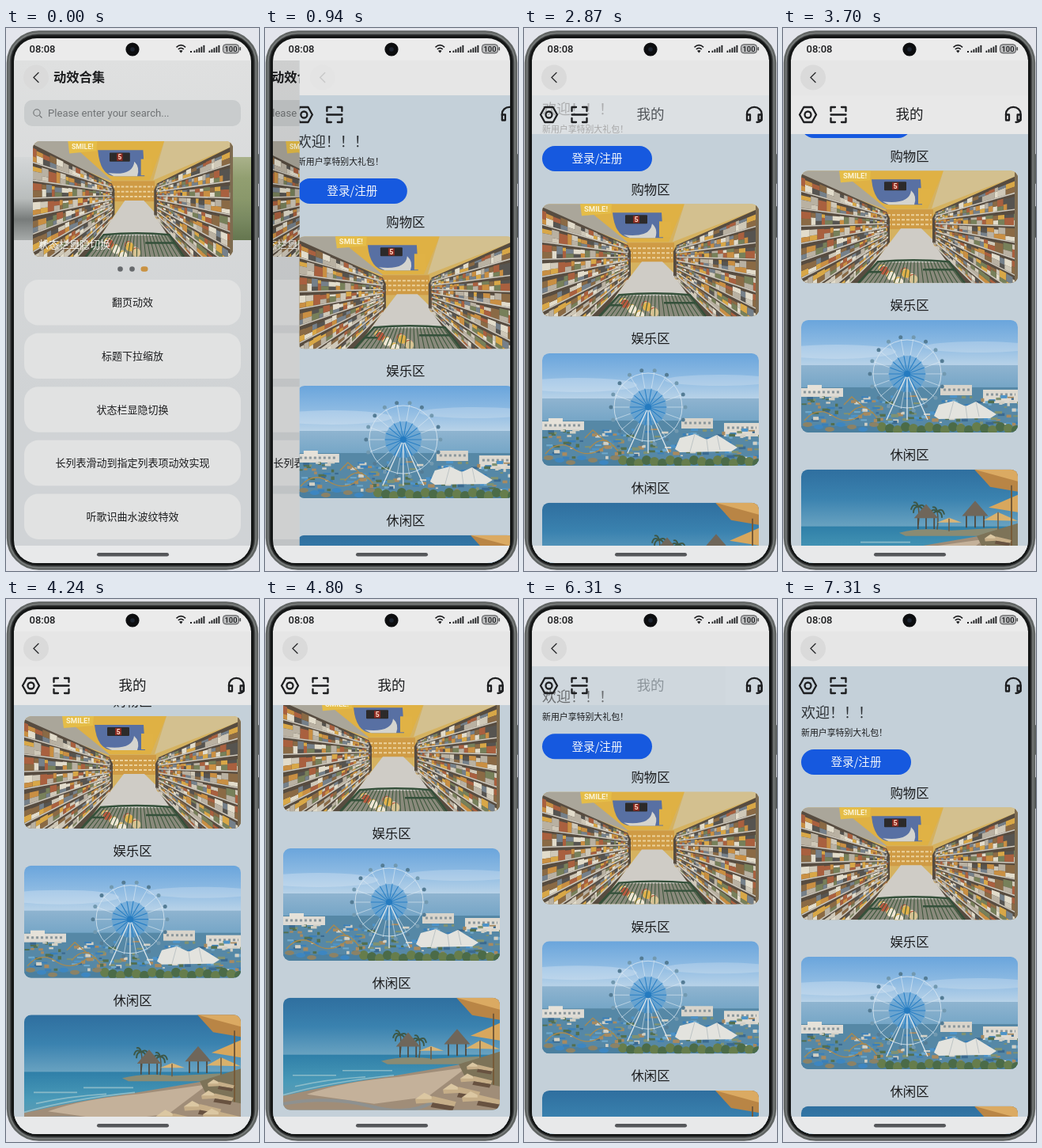
An HTML page that plays this animation: 320x686 px, repeating every 8 s.

```html
<!DOCTYPE html>
<html lang="zh-CN">
<head>
<meta charset="utf-8">
<title>动效合集</title>
<style>
  html, body { margin: 0; width: 100%; height: 100%; overflow: hidden; background: #e3e5ec; }
  svg { display: block; width: 100%; height: 100%; }
  text { font-family: "Noto Sans CJK SC", "Noto Sans CJK", sans-serif; }
  .latin { font-family: Roboto, sans-serif; }
  .icon { fill: none; stroke: #1d1e20; stroke-width: 2.3; stroke-linejoin: round; stroke-linecap: round; }
</style>
</head>
<body>
<svg id="stage" viewBox="0 0 320 686"></svg>
<script>
const LOOP = 8000;
const PHOTO_W = 274, PHOTO_H = 142;

let seed = 7;
const random = () => (seed = (seed * 16807) % 2147483647) / 2147483647;
const pick = list => list[Math.floor(random() * list.length)];
const clamp = v => Math.max(0, Math.min(1, v));
const range = (n, fn) => Array.from({ length: n }, (_, i) => fn(i)).join('');

// y is the visual centre of the line
function text(str, x, y, size, { fill = '#1b1c1e', weight = 500, anchor = 'start', cls = '' } = {}) {
  return `<text class="${cls}" x="${x}" y="${y + size * 0.37}" font-size="${size}" fill="${fill}"
    font-weight="${weight}" text-anchor="${anchor}">${str}</text>`;
}
const rect = (x, y, w, h, fill, r = 0, extra = '') =>
  `<rect x="${x}" y="${y}" width="${w}" height="${h}" rx="${r}" fill="${fill}" ${extra}/>`;
const poly = (points, fill) => `<polygon points="${points}" fill="${fill}"/>`;
const path = (d, fill, extra = '') => `<path d="${d}" fill="${fill}" ${extra}/>`;
const gradient = (id, ...colors) => `<linearGradient id="${id}" x2="0" y2="1">${
  colors.map((c, i) => `<stop offset="${i / (colors.length - 1)}" stop-color="${c}"/>`).join('')}</linearGradient>`;
const photo = (id, x, y, sx = 1, sy = 1) =>
  `<g transform="translate(${x} ${y}) scale(${sx} ${sy})" clip-path="url(#rounded)"><use href="#${id}"/></g>`;

// Shelves in one-point perspective, vanishing at (139, 66)
function shelf() {
  const colors = ['#d8a747', '#cfc8b8', '#a9603f', '#565450', '#75808a', '#e2dccb', '#8a6a45', '#c98f43', '#77805a', '#b9b1a2'];
  const goods = Object.fromEntries(colors.map(c => [c, '']));
  let edges = '';
  for (let k = -60; k < 135; k += 22) {
    for (let x = 0; x < 108;) {
      const near = (139 - x) / 139, w = (5 + random() * 8) * near, far = (139 - x - w) / 139;
      const split = k + 8 + random() * 5;
      const box = (top, bottom) => {
        goods[pick(colors)] += `M${x.toFixed(1)} ${(66 + top * near).toFixed(1)}L${(x + w).toFixed(1)} ${
          (66 + top * far).toFixed(1)}V${(66 + bottom * far).toFixed(1)}L${x.toFixed(1)} ${(66 + bottom * near).toFixed(1)}Z`;
      };
      box(k + 1 + random() * 4, split);
      box(split, k + 19);
      x += w;
    }
    edges += `M0 ${66 + k + 20}L108 ${66 + (k + 20) * 0.22}`;
  }
  return poly('0,4 108,52 112,60 112,90 74,142 0,142', '#574c40') +
    colors.map(c => path(goods[c], c)).join('') +
    path(edges, 'none', 'stroke="#cfcabf" stroke-width="1.5"');
}

function market() {
  return rect(0, 0, 274, 142, '#d5b260') +
    poly('0,0 50,0 110,50 0,10', '#aaa69a') +
    poly('48,0 180,0 160,48 108,48', '#dfb144') +
    poly('180,0 274,0 274,6 165,48', '#d3c08f') +
    path('M89 11H151L153 43H112Q92 42 89 11Z', '#5870a3') +
    path('M103 39Q137 43 139 25Q147 32 143 43H111Z', '#d4d4cf') +
    rect(148, 22, 15, 20, '#e0b245') +
    poly('48,0 88,0 87,12 50,15', '#e5bd48') +
    text('SMILE!', 68, 6, 9.5, { fill: '#faf3d5', weight: 700, anchor: 'middle', cls: 'latin' }) +
    rect(105, 14, 28, 11, '#2c2a2a', 1) + rect(115, 15, 8, 9, '#8d2b22') +
    text('5', 119, 19.5, 9, { fill: '#ffd9c4', weight: 700, anchor: 'middle', cls: 'latin' }) +
    rect(107, 49, 60, 25, '#cf9b45') +
    path('M109 56H165M109 62H165M109 68H165', 'none', 'stroke="#ebd19a" stroke-width="2" stroke-dasharray="4 2"') +
    poly('126,73 152,73 198,118 214,142 74,142 96,112', '#cfccc6') +
    shelf() + `<g transform="matrix(-1 0 0 1 278 0)">${shelf()}</g>` +
    rect(270, 0, 4, 142, '#7d6b50') +
    poly('96,116 186,116 205,142 74,142', '#8a8a7c') +
    range(14, i => `<circle cx="${103 + (i * 37) % 46}" cy="${124 + (i * 11) % 18}" r="5.5" fill="${
      ['#dfb04a', '#eee6d4', '#b75a40', '#d7c393'][i % 4]}"/>`) +
    path(range(22, i => `M${98 + i * 4.1} 115L${74 + i * 6.2} 142`), 'none', 'stroke="#3d573c" stroke-width="1.1"') +
    path('M72 142L97 115Q142 111 187 115L207 142M85 128H101M154 125H194', 'none', 'stroke="#34503a" stroke-width="2.4"');
}

function ferrisWheel() {
  const cx = 134, cy = 68, spokes = 18;
  const at = (i, r) => `${(cx + r * Math.cos(i * 2 * Math.PI / spokes)).toFixed(1)} ${
    (cy + r * Math.sin(i * 2 * Math.PI / spokes)).toFixed(1)}`;
  const rays = (from, to) => range(spokes, i => `M${at(i, from)}L${at(i, to)}`);
  const scatter = (n, y, h, colors) => range(n, () =>
    rect((random() * 274).toFixed(1), (y + random() * h).toFixed(1), (3 + random() * 7).toFixed(1), (1.5 + random() * 3).toFixed(1), pick(colors)));
  return rect(0, 0, 274, 58, 'url(#sky)') +
    `<ellipse cx="45" cy="40" rx="75" ry="9" fill="#dce8f2" opacity=".35"/>` +
    `<ellipse cx="225" cy="34" rx="70" ry="7" fill="#dce8f2" opacity=".3"/>` +
    rect(0, 57, 274, 30, 'url(#sea)') +
    rect(0, 85, 274, 57, '#5688a6') +
    rect(0, 86, 53, 11, '#dedbd4') + rect(8, 82, 18, 8, '#e6e2d9') + rect(176, 82, 40, 13, '#d8d4cb') +
    rect(230, 88, 44, 17, '#dedad1') + path('M3 91H50M180 88H213M234 94H271', 'none', 'stroke="#8b979c" stroke-width="3" stroke-dasharray="3 3"') +
    scatter(190, 95, 36, ['#3a7fb9', '#6fa8cb', '#a88a60', '#526f50', '#d2d0c5', '#3b6a90', '#7f9273', '#4d93c8']) +
    path('M4 127Q20 108 40 121T80 117M54 107L64 97L79 110M60 120Q78 98 96 124', 'none', 'stroke="#a8894f" stroke-width="1.3"') +
    `<circle cx="${cx}" cy="${cy}" r="23" fill="#5a9fd4" opacity=".6"/>` +
    path(rays(2, 24), 'none', 'stroke="#2b80c5" stroke-width="1.1"') +
    path(rays(23, 46), 'none', 'stroke="#dfebf3" stroke-width=".6"') +
    `<circle cx="${cx}" cy="${cy}" r="43" fill="none" stroke="#dce9f1" stroke-width=".8"/>` +
    path(`M${cx} ${cy}L108 126M${cx} ${cy}L160 126M${cx} ${cy}V126`, 'none', 'stroke="#dde6eb" stroke-width="1.3"') +
    `<circle cx="${cx}" cy="${cy}" r="4" fill="#257bc0"/>` +
    range(spokes, i => `<circle cx="${at(i, 47).replace(' ', '" cy="')}" r="2.5" fill="${i % 2 ? '#547c95' : '#7299b0'}"/>`) +
    poly('168,121 174,107 193,102 208,109 221,103 247,119 239,124 174,125', '#e3e3de') +
    path('M193 102L187 124M208 109L210 124M221 103L225 122', 'none', 'stroke="#bdc4c5"') +
    rect(0, 134, 274, 8, '#4b7f9f') +
    range(18, i => `<circle cx="${102 + i * 10}" cy="${135 + i % 3 * 2}" r="6" fill="${i % 2 ? '#4b6b48' : '#667d4c'}"/>`) +
    range(7, i => `<ellipse cx="${8 + i * 14}" cy="${132 + i % 3 * 3}" rx="6" ry="3" fill="${i % 2 ? '#3d86c1' : '#8b8266'}"/>`);
}

function beach() {
  const hut = (x, y, s) => `<g transform="translate(${x} ${y}) scale(${s})">` +
    path('M-12 0V18M12 0V18M0 0V18', 'none', 'stroke="#514a3f" stroke-width="2"') +
    poly('0,-19 18,2 -18,2', '#6f665a') + '</g>';
  const palm = (x, y) => path(`M${x} ${y}q2 10 0 23`, 'none', 'stroke="#5b5541" stroke-width="1.5"') +
    path(`M${x} ${y}q-7-5-9 4M${x} ${y}q7-5 9 4M${x} ${y}q-6 0-6 8M${x} ${y}q6 0 6 8M${x} ${y}q-2-7-6-5`, 'none', 'stroke="#3d5848" stroke-width="2"');
  const lounger = (x, y, s) => `<g transform="translate(${x} ${y}) scale(${s})">` +
    poly('0,0 20,-3 45,3 43,8 19,4 1,5', '#c6ae88') + poly('19,4 43,8 41,13 17,9', '#685240') +
    poly('0,0 10,-7 18,-3 18,0', '#dbc7a2') + '</g>';
  return rect(0, 0, 274, 73, 'url(#deepSky)') +
    rect(0, 72, 274, 70, 'url(#lagoon)') +
    path('M0 124Q70 108 138 99L238 82L274 90V142H0Z', '#a08d78') +
    path('M30 122Q75 106 146 100L232 88L183 125L115 134Z', '#c4b19a') +
    path('M0 123Q60 106 140 98M15 112Q55 103 104 100M75 92H138M12 98H67', 'none', 'stroke="#a9cbd0" stroke-width="1.6" opacity=".7"') +
    path('M0 134Q60 124 110 137T190 131', 'none', 'stroke="#8394a0" stroke-width="4" opacity=".6"') +
    path('M124 80Q150 73 190 77L250 74V84H132Z', '#8a8b73') +
    palm(148, 47) + palm(172, 53) + hut(158, 60, 0.85) + hut(220, 57, 0.92) +
    poly('172,67 187,61 203,67', '#dab577') + poly('231,64 249,54 274,65', '#d9b16c') +
    path('M249 54V96M187 62V78', 'none', 'stroke="#6e5a40" stroke-width="1.5"') +
    poly('219,0 274,0 274,28 239,22', '#b98545') + poly('219,0 274,0 274,15', '#dbaa62') +
    poly('237,48 274,32 274,54', '#d8a75d') +
    poly('222,84 274,68 274,112 232,104', '#7d7358') +
    path('M266 20V110', 'none', 'stroke="#765a38" stroke-width="2"') +
    lounger(232, 87, 0.75) + lounger(224, 102, 0.9) + lounger(202, 116, 1.05) + lounger(167, 128, 1.15) + lounger(226, 126, 1.1);
}

const backButton = `<circle cx="38" cy="62.5" r="16" fill="#dadada"/>` +
  path('M41 56.5L35 62.5L41 68.5', 'none', 'stroke="#2e2f31" stroke-width="1.4" stroke-linecap="round"');

function home() {
  const labels = ['翻页动效', '标题下拉缩放', '状态栏显隐切换', '长列表滑动到指定列表项动效实现', '听歌识曲水波纹特效'];
  return rect(-60, 41, 440, 640, 'url(#homeBg)') + backButton +
    text('动效合集', 60, 62, 16.3, { weight: 700 }) +
    rect(23, 91, 274, 33, '#c9cccd', 10) +
    path('M42.5 110.5L45.5 113.5', 'none', 'stroke="#6d7072" stroke-width="1.1"') +
    `<circle cx="39" cy="107" r="4.2" fill="none" stroke="#6d7072" stroke-width="1.1"/>` +
    text('Please enter your search...', 53, 107.5, 13.1, { fill: '#707375', weight: 400, cls: 'latin' }) +
    rect(10, 163, 40, 105, 'url(#leftPeek)') + rect(270, 163, 40, 105, 'url(#rightPeek)') +
    photo('market', 34, 143, 253 / PHOTO_W, 146 / PHOTO_H) +
    text('状态栏显隐切换', 41, 273, 13, { fill: '#f4f3ee', weight: 400 }) +
    '<circle cx="144.5" cy="304.5" r="3.3" fill="#66696c"/><circle cx="159.5" cy="304.5" r="3.3" fill="#66696c"/>' +
    rect(170.5, 301.2, 9, 6.6, '#c99242', 3.3) +
    labels.map((label, i) => rect(23, 318 + i * 67.6, 274, 57.5, '#e1e2e2', 18, i === 2 ? 'id="pressed"' : '') +
      text(label, 160, 346.5 + i * 67.6, 13, { anchor: 'middle' })).join('');
}

function scrollContent() {
  const sections = [['购物区', 'market'], ['娱乐区', 'ferris'], ['休闲区', 'beach']];
  return text('欢迎！！！', 23, 143, 18, { weight: 400, fill: '#2c3034' }) +
    text('新用户享特别大礼包！', 23, 168.5, 10.9, { weight: 400 }) +
    rect(23, 190, 139, 32, '#1659df', 16) +
    text('登录/注册', 92.5, 206, 14.6, { fill: '#eef3fb', anchor: 'middle' }) +
    sections.map(([label, id], i) => text(label, 160, 244.5 + i * 188.7, 16.4, { anchor: 'middle' }) +
      photo(id, 23, 263.3 + i * 188.7)).join('');
}

const toolIcons = `<g class="icon">
  <path d="M21 109.5L26.3 100H36.7L42 109.5L36.7 119H26.3Z"/><circle cx="31.5" cy="109.5" r="4"/>
  <path d="M60.5 105V100H66M74 100H79.5V105M60.5 114V119H66M74 119H79.5V114M60.5 109.5H79.5"/>
  <path d="M282 110V108.5A9.3 8.6 0 0 1 300.6 108.5V114Q300.6 119 294.5 119"/>
  <path d="M282 109.5H286V116.5H282ZM300.6 109.5H296.6V116.5H300.6Z"/></g>`;

const statusBar = rect(10, 12, 300, 29, '#ebebeb') +
  text('08:08', 29.5, 26.2, 13, { cls: 'latin' }) +
  `<circle cx="160" cy="27" r="8.6" fill="#0c0d0f"/><circle cx="160" cy="27" r="2.8" fill="#1d2430"/>` +
  path('M215.5 24.3Q221.3 19 227.1 24.3M217.8 26.9Q221.3 23.8 224.8 26.9', 'none', 'stroke="#1d1e20" stroke-width="1.6"') +
  path('M221.3 31.5L219 28.8Q221.3 27 223.6 28.8Z', '#1d1e20') +
  rect(233, 29, 2, 2, '#1d1e20') +
  [237.5, 256.5].map(x => range(5, i => rect(x + i * 3, 28.5 - i * 1.7, 1.8, 2.5 + i * 1.7, '#1d1e20', 0.6))).join('') +
  rect(274.5, 20.8, 20, 11, '#b9babb', 3.5, 'stroke="#4b4c4e" stroke-width="1"') + rect(295.5, 24, 1.6, 4.5, '#4b4c4e', 0.8) +
  text('100', 284.5, 26.2, 9.4, { anchor: 'middle', cls: 'latin' });

document.getElementById('stage').innerHTML = `<defs>
  ${gradient('homeBg', '#dfe0e0', '#d6d8d9', '#d0d3d5', '#d0d3d6')}
  ${gradient('leftPeek', '#d4d7d8', '#c7cbcc', '#b9bdbc', '#777b7a', '#a6aaa9')}
  ${gradient('rightPeek', '#aab28b', '#929f71', '#8a986b', '#798961', '#65764f')}
  ${gradient('sky', '#6aa5dc', '#8bb9e2', '#b9d3e8')}
  ${gradient('sea', '#8fb4d0', '#74a5c6')}
  ${gradient('deepSky', '#2f6f9f', '#3a82af', '#6aa3c1')}
  ${gradient('lagoon', '#2f7fa8', '#4a9ab8', '#6a9cb0')}
  <clipPath id="screen"><rect x="10" y="13" width="300" height="663" rx="29"/></clipPath>
  <clipPath id="rounded"><rect width="${PHOTO_W}" height="${PHOTO_H}" rx="9"/></clipPath>
  <clipPath id="pageClip"><rect id="pageEdge" x="10" y="41" width="300" height="640"/></clipPath>
  <g id="market">${market()}</g><g id="ferris">${ferrisWheel()}</g><g id="beach">${beach()}</g>
</defs>
${rect(0, 0, 320, 686, '#e3e5ec')}
${rect(317, 159, 3, 38, '#565a59', 1)}${rect(317, 225, 3, 40, '#3c403f', 1)}
${rect(1.5, 4, 317, 680, '#5d605f', 40, 'stroke="#626665" stroke-width="1.5"')}
${rect(4, 6.5, 312, 675, '#47494a', 37, 'stroke="#7c807f" stroke-width="1.4"')}
${rect(6.5, 9, 307, 670, '#141616', 33, 'stroke="#2b2d2d"')}
<g clip-path="url(#screen)">
  <g id="home">${home()}</g>
  <rect id="shade" x="10" y="41" width="300" height="640"/>
  <g clip-path="url(#pageClip)" id="page">
    ${rect(10, 41, 300, 640, '#c4d0d9')}
    <g id="content"><g id="scroller">${scrollContent()}</g>
      <g id="bar">${rect(10, 85, 300, 49, '#e8e8e8')}${text('我的', 160, 109, 17.5, { anchor: 'middle' })}</g>
      ${toolIcons}</g>
    ${rect(10, 41, 300, 44, '#e6e6e6')}
    <g id="back">${backButton}</g>
  </g>
  ${statusBar}
  ${rect(10, 654, 300, 24, '#e8e9ea')}${rect(115, 663, 91, 4.6, '#55575a', 2.3)}
</g>`;

const el = Object.fromEntries([...document.querySelectorAll('[id]')].map(node => [node.id, node]));
const move = (node, x, y = 0) => node.setAttribute('transform', `translate(${x.toFixed(2)} ${y.toFixed(2)})`);

const PUSH_TIME = 940;
const scrollKeys = [[2110, 0], [2870, 41], [3000, 43], [3700, 83], [4520, 132], [4800, 137], [5000, 137], [5690, 75], [6510, 2], [6700, 0]];

function scrollAt(t) {
  const next = scrollKeys.findIndex(([time]) => time > t);
  if (next < 1) return 0;
  const [t0, y0] = scrollKeys[next - 1], [t1, y1] = scrollKeys[next];
  return y0 + (y1 - y0) * (t - t0) / (t1 - t0);
}

function draw(t) {
  const pushed = t >= PUSH_TIME;
  const remaining = pushed ? Math.exp((PUSH_TIME - t) / 130) : 1;
  el.page.style.display = pushed ? '' : 'none';
  el.shade.setAttribute('opacity', pushed ? 0.08 : 0);
  el.pressed.setAttribute('fill', t >= 470 && t < PUSH_TIME ? '#d9dadb' : '#e1e2e2');
  move(el.home, pushed ? -52 - 8 * (1 - remaining) : 0);

  el.pageEdge.setAttribute('x', 10 + 34 * remaining);
  move(el.content, 18 * remaining);
  move(el.back, 35 * remaining);
  el.back.setAttribute('opacity', 1 - 0.85 * remaining);

  const scroll = scrollAt(t);
  move(el.scroller, 0, -scroll);
  el.bar.setAttribute('opacity', clamp(scroll / 60));
}

const start = performance.now();
function tick() {
  draw((performance.now() - start) % LOOP);
  requestAnimationFrame(tick);
}
tick();
</script>
</body>
</html>
```
